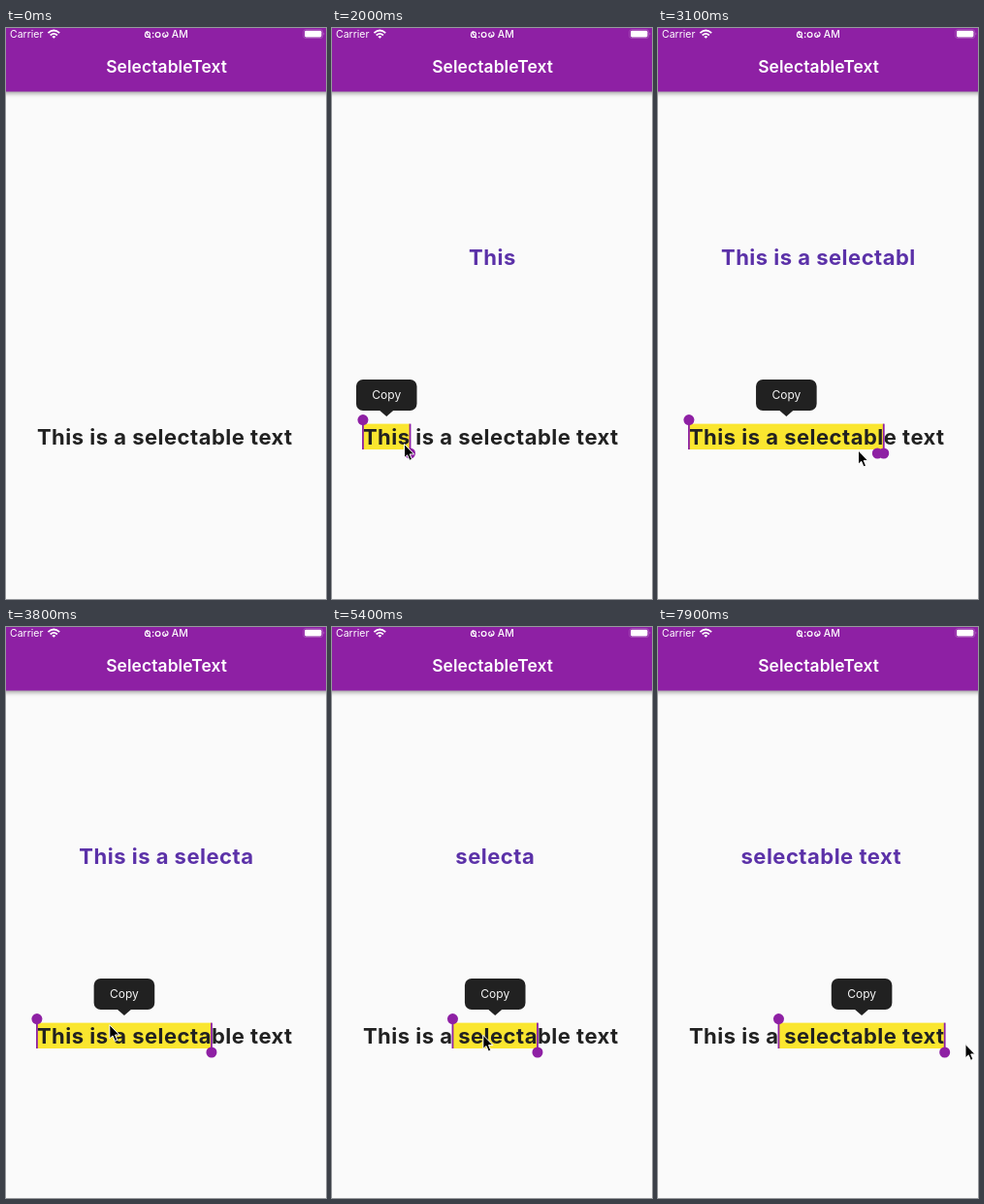
These frames come from a looping animation (330x588 px, 8 s). An HTML page:

```html
<!DOCTYPE html>
<html lang="en">
<head>
<meta charset="utf-8">
<title>SelectableText</title>
<style>
  html, body { margin: 0; width: 100%; height: 100%; overflow: hidden; background: #fafafa; }
  svg { display: block; width: 100%; height: 100%; }
  text { font-family: Inter, Roboto, "Liberation Sans", sans-serif; }
  .big { font-size: 22px; font-weight: 700; letter-spacing: .49px; text-anchor: middle; }
  .status { font-size: 10.5px; fill: #fff; }
  .bar { fill: #8e20a4; filter: drop-shadow(0 2px 2px rgba(0, 0, 0, .36)); }
  .handle { fill: #8e20a4; }
  .line { fill: none; stroke: #fff; stroke-width: 1.2; stroke-linecap: round; stroke-linejoin: round; }
</style>
</head>
<body>
<svg viewBox="0 0 330 588">
  <rect width="330" height="588" fill="#fafafa"/>
  <rect class="bar" x="-8" y="-8" width="346" height="73.5"/>

  <text class="status" x="4" y="10">Carrier</text>
  <g fill="none" stroke="#fff" stroke-width="1.8">
    <path d="M43.4 5.2Q49.3 -.1 55.2 5.2"/>
    <path d="M45.7 7.5Q49.3 4.3 52.9 7.5"/>
    <path d="M49.3 10.8L47.4 8.9Q49.3 7.3 51.2 8.9Z" fill="#fff" stroke="none"/>
  </g>
  <g class="line">
    <path d="M145.5 3.6C142.6 4.6 142.8 9.5 145.6 9.5C149 9.5 149.3 4.2 146.6 4.2C144.8 4.2 145 7 146.6 6.8M147.4 8.8L148.8 10"/>
    <circle cx="156.6" cy="6.9" r="2.4"/>
    <path d="M163.4 5C161.2 4.8 160.9 9.4 163.6 9.4C165.4 9.4 165.2 7.4 164.2 7.2M165 9C167.6 8.4 167.6 5 165.8 4.2"/>
  </g>
  <text class="status" x="150" y="9.8" font-weight="600">:</text>
  <text class="status" x="170.7" y="10" font-weight="500">AM</text>
  <rect x="306.7" y="1.7" width="20" height="8.8" rx="2.4" fill="none" stroke="#fff" stroke-opacity=".25" stroke-width=".8"/>
  <rect x="308" y="2.8" width="17.4" height="6.6" rx="1.4" fill="#fff"/>
  <path d="M327.6 4.6Q329 6.1 327.6 7.6Z" fill="#fff" fill-opacity=".5"/>
  <text x="165.6" y="46" font-size="17.4" font-weight="600" letter-spacing=".1" text-anchor="middle" fill="#fff">SelectableText</text>

  <text id="echo" class="big" x="165.4" y="244.3" fill="#5b31a8"></text>
  <rect id="mark" y="407.6" height="26.4" fill="#fae62f"/>
  <text id="label" class="big" x="163.8" y="429" fill="#212121">This is a selectable text</text>

  <g id="handles" class="handle">
    <g id="left"><rect x="-.9" y="404" width="1.8" height="30"/><circle cy="403.6" r="5.5"/></g>
    <g id="right"><rect x="-.9" y="407.6" width="1.8" height="30"/><circle cy="438" r="5.5"/></g>
    <circle id="trail" cy="438" r="5.5"/>
  </g>

  <g id="popup">
    <path d="M-7.5 393.5H7.5L0 400Z" fill="#212121"/>
    <rect x="-31.3" y="362" width="62.6" height="32" rx="7" fill="#212121"/>
    <text y="381.7" font-size="12" text-anchor="middle" fill="#f4f4f4">Copy</text>
  </g>
  <path id="cursor" d="M0 0V14.2L3.2 11.3L5.5 16.8L8 15.8L5.7 10.4H10.1Z" fill="#000" stroke="#fff" stroke-width="1" stroke-linejoin="round"/>
</svg>
<script>
  const LOOP = 8000, STEP = 100, LAG = 200;
  const ENTER = 300, SELECT = 1400;

  // Pointer moves: from ms, to ms, end point
  const moves = [
    [ENTER, 1200, 57, 421],   // to the first word
    [1500, 2000, 74.5, 428.5],
    [2100, 2800, 238, 437],   // drag right handle out
    [2800, 3100, 206.5, 435], // and back
    [3500, 4050, 31, 403],    // to the left handle
    [4250, 5200, 121.5, 403], // drag it
    [5300, 5600, 254, 434],
    [6300, 6600, 258, 450],
    [6600, 6900, 220, 435],
    [7100, 7900, 317, 429.5]  // drag right handle to the end
  ];

  const $ = id => document.getElementById(id);
  const clamp = (v, lo, hi) => Math.min(hi, Math.max(lo, v));
  const smooth = p => p * p * (3 - 2 * p);
  const easeOut = p => 1 - (1 - p) ** 2;

  const label = $("label"), text = label.textContent;
  const carets = [...text].map((_, i) => label.getStartPositionOfChar(i).x);
  carets.push(label.getEndPositionOfChar(text.length - 1).x);

  function pointer(t) {
    let x = 334, y = 470;
    for (const [from, to, endX, endY] of moves) {
      const p = clamp((t - from) / (to - from), 0, 1);
      x += (endX - x) * smooth(p);
      y += (endY - y) * easeOut(p);
    }
    return [x, y];
  }

  function nearest(x) {
    const gaps = carets.map(c => Math.abs(c - x));
    return gaps.indexOf(Math.min(...gaps));
  }

  // A held handle snaps to the caret nearest the pointer, slightly late
  const drag = (t, from, to, grip) => nearest(pointer(clamp(t - LAG, from, to))[0] + grip);
  const startAt = t => drag(t, 4050, 5200, 1);
  const endAt = t => t < 6900 ? drag(t, 2000, 3100, 5) : drag(t, 6900, 7900, -9);

  const move = (id, x, y = 0) => $(id).setAttribute("transform", `translate(${x} ${y})`);
  const show = (id, on) => $(id).style.display = on ? "" : "none";

  function draw(t) {
    const start = startAt(t), end = endAt(t), next = endAt(t + STEP);
    const x1 = carets[start], x2 = carets[end], selected = t >= SELECT;

    $("echo").textContent = selected ? text.slice(start, end).replace(/ /g, "\u00a0") : "";
    $("mark").setAttribute("x", x1);
    $("mark").setAttribute("width", x2 - x1);
    move("left", x1);
    move("right", x2);
    move("trail", carets[next]);
    move("popup", (x1 + x2) / 2);
    move("cursor", ...pointer(t));

    show("mark", selected);
    show("handles", selected);
    show("trail", next < end);
    show("popup", t >= SELECT + STEP);
    show("cursor", t >= ENTER);
  }

  const origin = performance.now();
  function tick() {
    const t = (performance.now() - origin) % LOOP;
    draw(Math.floor(t / STEP) * STEP);
    requestAnimationFrame(tick);
  }
  tick();
</script>
</body>
</html>
```
